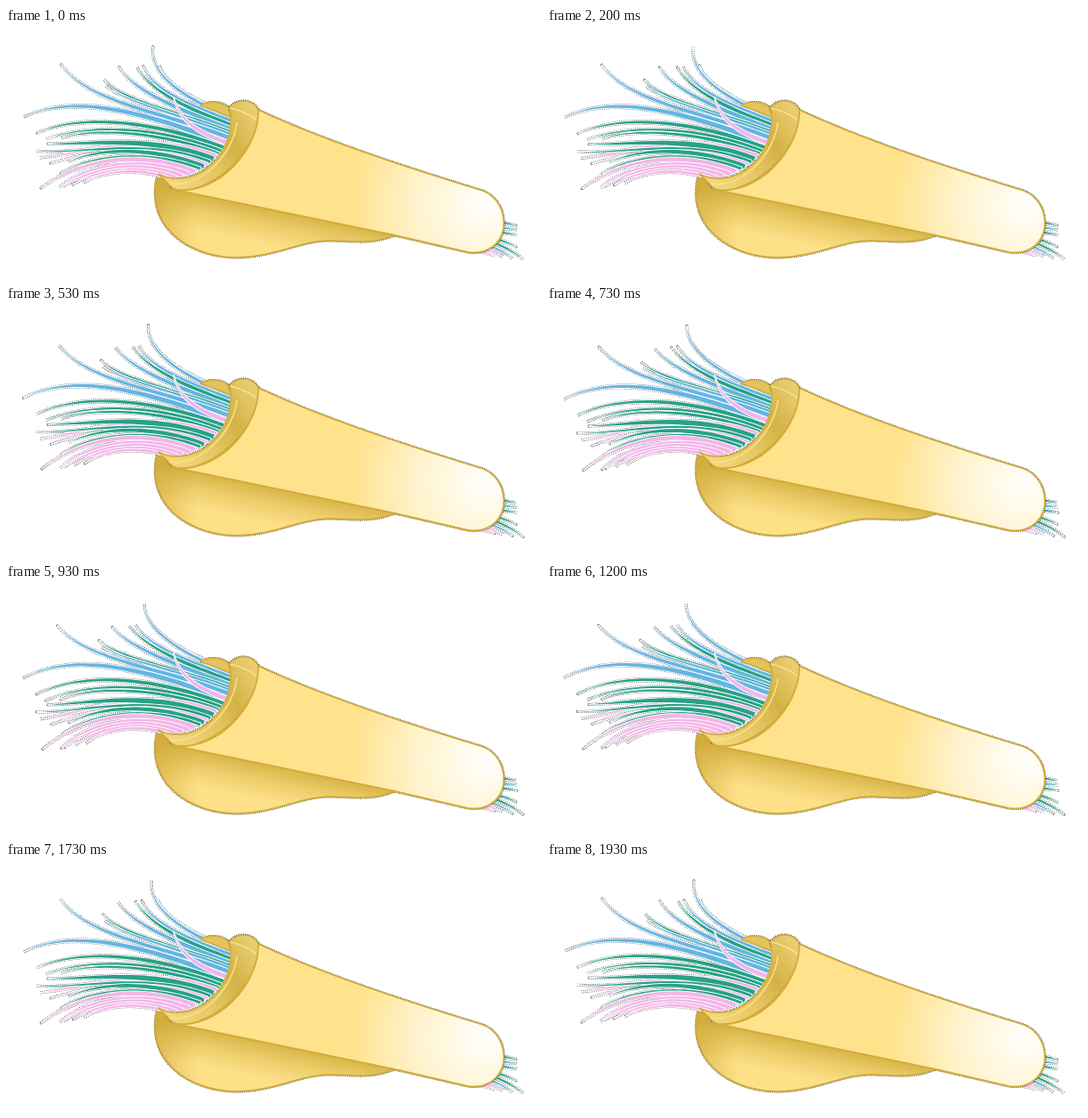
Write an HTML page with a canvas that moves like this. It is 600x281 px and loops after 2000 ms.

```html
<!DOCTYPE html>
<html>
<head>
<meta charset="utf-8">
<style>
html, body { margin: 0; height: 100%; overflow: hidden; background: #fff; }
canvas { display: block; }
</style>
</head>
<body>
<canvas id="stage" width="600" height="281"></canvas>
<script>
const ctx = document.getElementById('stage').getContext('2d');
const BLUE = '#63b5e2', GREEN = '#28a186', PINK = '#f4b5e8', GOLD = '#d3ad3c';

// Strand: position along the mouth (0 top, 1 bottom), width, tip x y, bend x y
const blues = [
  [.03, 3.4, 165, 21, 160, 57],
  [.01, 2.6, 172, 42, 180, 66],
  [.07, 4.2, 154, 43, 166, 72],
  [.15, 4.8, 127, 44, 143, 72],
  [.20, 3, 112, 65, 130, 82],
  [.24, 4.6, 62, 41, 92, 84],
  [.31, 5.6, 20, 100, 78, 72]
];
const greens = [
  [.11, 4.4, 147, 44, 163, 73],
  [.18, 3.6, 110, 58, 130, 82],
  [.36, 4.4, 35, 118, 84, 96],
  [.40, 3.2, 45, 125, 90, 108],
  [.44, 3.4, 62, 124, 95, 112],
  [.52, 6.4, 47, 130, 100, 131],
  [.56, 3.2, 34, 138, 78, 143],
  [.64, 5, 70, 150, 108, 134],
  [.68, 3, 62, 163, 92, 143]
];
const pinks = [
  [.48, 6, 38, 146, 96, 139],
  [.60, 3.2, 50, 152, 92, 140],
  [.74, 5.2, 39, 180, 84, 147],
  [.80, 4.6, 60, 179, 88, 154],
  [.86, 4.2, 64, 178, 96, 157],
  [.92, 4, 75, 176, 100, 160],
  [.97, 3, 87, 174, 108, 161]
];
const curl = [.30, 4.6, 188, 78, 196, 108];
// Far end: start x y, tip x y
const tuft = [
  [552, 218, 572, 222, GREEN], [552, 224, 573, 227, BLUE],
  [550, 229, 573, 233, GREEN], [544, 240, 580, 260, GREEN],
  [546, 236, 572, 246, GREEN], [540, 244, 568, 259, BLUE],
  [530, 248, 557, 257, PINK], [528, 250, 548, 256, PINK]
];

const flap = new Path2D('M171 163C166 175 166 194 171 207C182 238 218 258 260 258C303 257 330 239 362 239C390 239 408 244 436 233L184 181Z');
const cone = new Path2D('M283 92C350 124 440 154 535 183C552 190 560 207 558 225C555 244 538 255 518 252L436 233L190 182C238 187 284 137 283 92Z');
const band = new Path2D('M251 89C256 84 260 82 266 82C274 82 280 86 283 92C284 128 252 168 210 181C198 184 187 183 183 176L171 164C185 172 205 171 222 160C245 144 256 118 251 89Z');
const bump = new Path2D('M218 87C229 81 243 83 249 89L252 100Z');
const seam = new Path2D('M251 90C262 92 272 97 281 103M183 175C215 181 254 146 259 106');

function fade(g, ...stops) {
  stops.forEach((c, i) => g.addColorStop(i / (stops.length - 1), c));
  return g;
}
const flapFill = fade(ctx.createLinearGradient(300, 204, 292, 243), '#d8b548', '#ecce6b', '#fde088');
const sideShade = fade(ctx.createLinearGradient(167, 0, 215, 0), 'rgba(205,165,50,.6)', 'rgba(205,165,50,0)');
const coneFill = fade(ctx.createRadialGradient(538, 199, 5, 520, 200, 135), '#fffefa', '#fff3cc', '#ffe28c');
const bandFill = fade(ctx.createLinearGradient(185, 165, 282, 100), '#f2d67a', '#e6c864', '#d4b246', '#e9cd70');

const mix = (a, b, c, d, s) => {
  const r = 1 - s;
  return r * r * r * a + 3 * r * r * s * b + 3 * r * s * s * c + s * s * s * d;
};

// Tapered outline along a cubic running from tip to base
function blade(tip, c1, c2, base, w, color) {
  const left = [], right = [], N = 28;
  const at = s => [0, 1].map(k => mix(tip[k], c1[k], c2[k], base[k], s));
  for (let i = 0; i <= N; i++) {
    const s = i / N, [x, y] = at(s), [px, py] = at(s - .01), [qx, qy] = at(s + .01);
    const h = w / 2 * s * (2 - s) / Math.hypot(qx - px, qy - py);
    left.push([x - (qy - py) * h, y + (qx - px) * h]);
    right.unshift([x + (qy - py) * h, y - (qx - px) * h]);
  }
  const path = new Path2D();
  left.concat(right).forEach(p => path.lineTo(...p));
  path.closePath();
  return { path, color };
}

function strand([u, w, tx, ty, cx, cy], color, sway) {
  const base = [mix(256, 254, 225, 180, u), mix(98, 135, 165, 170, u)];
  const reach = .4 * Math.hypot(base[0] - tx, base[1] - ty);
  // Tips swing about the middle of the bundle, the upper ones furthest
  const rx = tx - 180, ry = ty - 130, r = Math.hypot(rx, ry);
  const amp = sway * (6 + 4 * Math.max(0, -ry / r) ** 2);
  const dx = ry / r * amp, dy = -rx / r * amp;
  return blade([tx + dx, ty + dy], [cx + dx * .4, cy + dy * .4],
    [base[0] - reach * .93, base[1] - reach * .36], base, w, color);
}

function tuftBlade([x, y, tx, ty, color], sway) {
  const ex = tx, ey = ty - sway;
  return blade([ex, ey], [x + (ex - x) * .7, y + (ey - y) * .55],
    [x + (ex - x) * .3, y + (ey - y) * .2], [x, y], 2.4, color);
}

function stroke(path, color, width, dash = []) {
  ctx.strokeStyle = color;
  ctx.lineWidth = width;
  ctx.setLineDash(dash);
  ctx.stroke(path);
}
const dots = (path, width) => stroke(path, '#222', width, [1, 1.4]);

function blades(list) {
  list.forEach(b => dots(b.path, 2.8));
  list.forEach(b => {
    stroke(b.path, '#fff', 1.8);
    ctx.fillStyle = b.color;
    ctx.fill(b.path);
  });
}

function solid(path, fill, width = 1.8) {
  ctx.fillStyle = fill;
  ctx.fill(path);
  stroke(path, GOLD, width);
}

function draw(sway) {
  ctx.fillStyle = '#fff';
  ctx.fillRect(0, 0, 600, 281);
  ctx.lineJoin = 'round';
  blades(tuft.map(b => tuftBlade(b, sway)));
  [flap, cone, band, bump].forEach(p => dots(p, 3));
  solid(flap, flapFill);
  ctx.fillStyle = sideShade;
  ctx.fill(flap);

  const all = [[blues, BLUE], [greens, GREEN], [pinks, PINK]]
    .flatMap(([list, color]) => list.map(s => [s, color]))
    .sort((a, b) => a[0][0] - b[0][0]);
  all.push([curl, PINK]);
  blades(all.map(([s, color]) => strand(s, color, s === curl ? 0 : sway)));

  solid(bump, '#e3c35c', 1.5);
  solid(band, bandFill, 1.6);
  stroke(seam, '#f8e08c', 1.6);
  solid(cone, coneFill);
}

const start = performance.now();
function tick() {
  const t = (performance.now() - start) % 2000;
  // 30 poses per loop, switching on 10 ms marks
  const step = Math.ceil((Math.floor(t / 10) + 1) * 3 / 20) - 1;
  draw((1 - Math.cos(step / 30 * 2 * Math.PI)) / 2);
  requestAnimationFrame(tick);
}
tick();
</script>
</body>
</html>
```
